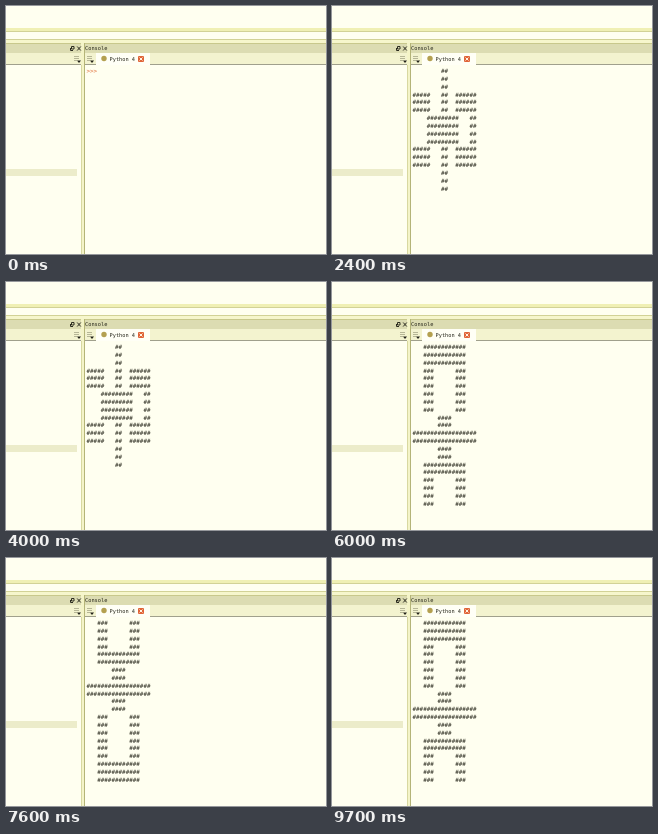
These frames come from a looping animation (320 px wide and 248 px high, 9900 ms). An HTML page:

```html
<!DOCTYPE html>
<html lang="en">
<head>
<meta charset="utf-8">
<title>Console</title>
<style>
  html, body { margin: 0; width: 100%; height: 100%; overflow: hidden; background: #fffff0; }
  svg { display: block; width: 320px; height: 248px; }
  text { font-family: "DejaVu Sans Mono", monospace; white-space: pre; fill: #26261a; }
  .ui { font-size: 5.3px; }
  .out { font-size: 5.92px; }
  .cjk { font-family: "Noto Sans CJK SC", "Noto Sans CJK", sans-serif; font-size: 6.6px; }
  .prompt { fill: #e0703c; }
</style>
</head>
<body>
<svg viewBox="0 0 320 248">
  <rect width="320" height="248" fill="#fffff0"/>

  <!-- window bars -->
  <g shape-rendering="crispEdges">
    <rect y="22" width="320" height="3" fill="#f0f0b4"/>
    <rect y="25" width="320" height="1" fill="#d2d296"/>
    <rect y="33" width="320" height="1" fill="#d2d296"/>
    <rect y="34" width="320" height="3" fill="#f6f6cc"/>
    <rect y="37" width="320" height="10" fill="#dcdcb2"/>
    <rect y="37" width="320" height="1" fill="#c8c88c"/>
    <rect y="47" width="320" height="11" fill="#f3f3cf"/>
    <rect y="58" width="320" height="1" fill="#a0a08c"/>
    <rect y="163" width="71" height="7" fill="#ececca"/>
    <rect x="75" y="37" width="4" height="211" fill="#f4f4c8"/>
    <rect x="75" y="59" width="1" height="189" fill="#d8d8a0"/>
    <rect x="78" y="37" width="1" height="211" fill="#b4b478"/>
    <rect x="90" y="47" width="54" height="12" fill="#fffff6"/>
  </g>

  <!-- dock buttons -->
  <g fill="none" stroke="#2c2c20">
    <path d="M65.500 40.500h2.500v2.500h-2.500zM64.500 42v2.500h2.500"/>
    <path d="M71.200 40.500l3.600 4M74.800 40.500l-3.600 4"/>
  </g>
  <g id="menus"></g>

  <!-- tab -->
  <circle cx="98" cy="52.500" r="2.700" fill="#b4a050"/>
  <rect x="132" y="50" width="6" height="6" rx="1" fill="#e06438"/>
  <path d="M133.500 51.500l3 3M136.500 51.500l-3 3" stroke="#fff4e4"/>
  <text class="ui" x="79" y="44.300">Console</text>
  <text class="ui" x="103.500" y="54.500">Python 4</text>

  <text class="out" id="cmd" x="80.500" y="67"><tspan class="prompt">&gt;&gt;&gt; </tspan><tspan id="call">runfile('D:/<tspan class="cjk">学习</tspan>/<tspan class="cjk">计算物理</tspan>/untitled5.py', wdir='D:/<tspan class="cjk">学习</tspan>/<tspan class="cjk">计算物理</tspan>')</tspan></text>
  <g id="screen"></g>
</svg>

<script>
const LOOP = 9900, LEFT = 80.5, BASE = 67, ROW = 7.84;
const NS = 'http://www.w3.org/2000/svg';
const byId = id => document.getElementById(id);

function add(parent, tag, attrs) {
  const el = document.createElementNS(NS, tag);
  for (const key in attrs) el.setAttribute(key, attrs[key]);
  parent.append(el);
  return el;
}

for (const x of [68, 81]) {
  add(byId('menus'), 'path', { d: `M${x} 50.500h5M${x} 52.500h5M${x} 54.500h3`, stroke: '#a8a888', 'stroke-width': 0.8 });
  add(byId('menus'), 'path', { d: `M${x + 3} 54.500h4l-2 2.500z`, fill: '#202018' });
}

const rows = (...runs) => runs.flatMap(([n, line]) => Array(n).fill(line));
const bar = '   ############';
const sides = '   ###      ###';
const hub = '       ####';
const wide = '#'.repeat(18);
const wheel = '#####   ##  ######';
const barrel = '        ##';

const up = rows([3, bar], [6, sides], [2, hub], [2, wide], [2, hub], [2, bar], [4, sides]);
const down = [...up].reverse();
const across = rows([3, barrel], [3, wheel], [4, '    #########   ##'], [3, wheel], [3, barrel]);

function makeFigure(lines) {
  const g = add(byId('screen'), 'g', {});
  lines.forEach((line, i) => {
    const col = line.search('#');
    const t = add(g, 'text', { class: 'out', x: LEFT + col * 3.564, y: BASE + i * ROW });
    t.textContent = line.slice(col);
  });
  return g;
}

const figures = { up: makeFigure(up), down: makeFigure(down), across: makeFigure(across) };

// start time, figure, command line state
const steps = [
  [0, '', 'prompt'],
  [900, '', 'call'],
  [1000, 'up', 'call'],
  [2000, 'across'],
  [3000, 'down'],
  [4000, 'across'],
  [5000, 'up'],
  [6100, 'across'],
  [7100, 'down'],
  [8100, 'across'],
  [9100, 'up']
];

const show = (el, on) => el.setAttribute('display', on ? 'inline' : 'none');

function draw() {
  const t = performance.now() % LOOP;
  const [, name, line] = steps.filter(s => s[0] <= t).pop();
  show(byId('cmd'), line);
  show(byId('call'), line === 'call');
  for (const key in figures) show(figures[key], key === name);
  byId('screen').setAttribute('transform', `translate(0 ${line ? ROW : 0})`);
  requestAnimationFrame(draw);
}
draw();
</script>
</body>
</html>
```
